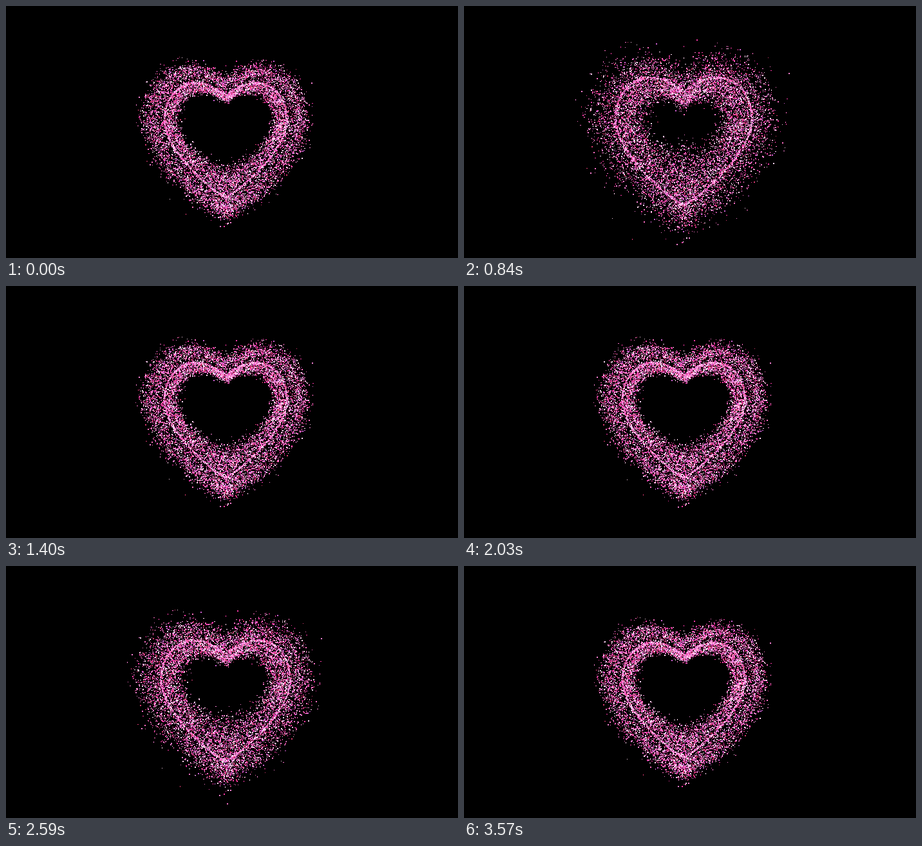
An HTML page with a canvas that plays this animation: 702 by 392 pixels, repeating every 3640 ms.

```html
<!DOCTYPE html>
<html lang="en">
<head>
<meta charset="utf-8">
<title>Beating heart</title>
<style>
html, body { margin: 0; width: 100%; height: 100%; overflow: hidden; background: #000; }
canvas { display: block; width: 702px; height: 392px; }
</style>
</head>
<body>
<canvas id="stage" width="702" height="392"></canvas>
<script>
const ctx = document.getElementById('stage').getContext('2d');
const CX = 340.5, CY = 190;
const LOOP = 3640, STEP = 70;
const BEAT = 1600, RISE = 690, START = 150;
const COLORS = ['#ff6ec4', '#fa38a8', '#f780d2', '#ffd6f0', '#d8386f', '#cc5fd0'];

// Right half of the heart: Bezier points and share of the outline.
const CURVES = [
  { share: 0.18, p: [0, -52, 14, -60, 28, -71, 46, -71] },
  { share: 0.29, p: [46, -71, 76, -71, 95, -45, 95, -12] },
  { share: 0.53, p: [95, -12, 95, 32, 24, 96, 0, 107] }
];

let seed = 20731;
function rand() {
  seed = (seed + 0x6d2b79f5) | 0;
  let n = Math.imul(seed ^ (seed >>> 15), 1 | seed);
  n = (n + Math.imul(n ^ (n >>> 7), 61 | n)) ^ n;
  return ((n ^ (n >>> 14)) >>> 0) / 4294967296;
}
const gauss = () => Math.sqrt(-2 * Math.log(1 - rand())) * Math.cos(2 * Math.PI * rand());
const jitter = r => (rand() * 2 - 1) * r;

function outline() {
  let pick = rand(), i = 0;
  while (i < 2 && pick > CURVES[i].share) pick -= CURVES[i++].share;
  const p = CURVES[i].p, t = rand(), u = 1 - t;
  const at = k => u * u * u * p[k] + 3 * u * u * t * p[k + 2] + 3 * u * t * t * p[k + 4] + t * t * t * p[k + 6];
  return { x: at(0) * (rand() < 0.5 ? -1 : 1), y: at(1) };
}

const dots = COLORS.map(() => []);
function pickColor(weights) {
  let r = rand(), i = 0;
  while (i < weights.length - 1 && r > weights[i]) r -= weights[i++];
  return i;
}
const MIXED = [0.26, 0.2, 0.2, 0.2, 0.08, 0.06];
const PINK = [0.5, 0.1, 0.3, 0.1, 0, 0];

// Resting place (x, y), and the way (dx, dy) the dot travels at full pulse.
function add(x, y, dx, dy, weights) {
  dots[pickColor(weights)].push({
    x, y, dx, dy,
    w: rand() < 0.42 ? 2 : 1, h: rand() < 0.42 ? 2 : 1
  });
}

// The clouds keep their middle and spread around it.
function addCloud(o, ux, uy, middle, sigma) {
  const d = gauss() * sigma, r = middle + d;
  add(o.x + ux * r + jitter(2), o.y + uy * r + jitter(2), ux * d * 1.05, uy * d * 1.05, MIXED);
}
function addHalo() {
  const o = outline(), r = Math.hypot(o.x, o.y);
  addCloud(o, o.x / r, o.y / r, 19, 9.5);
}
function addInner() {
  const o = outline(), depth = 1 + Math.max(0, o.y) / 130;
  addCloud(o, -o.x * depth, -o.y * depth, 0.09, 0.07);
}
function addLine() {
  const o = outline();
  add(o.x + jitter(1.3), o.y + jitter(1.3), o.x * 0.115, o.y * 0.115, PINK);
}

for (let i = 0; i < 5600; i++) addHalo();
for (let i = 0; i < 5200; i++) addInner();
for (let i = 0; i < 1500; i++) addLine();

function pulse(t) {
  const p = (t - START + BEAT) % BEAT;
  return Math.pow(p < RISE ? p / RISE : (BEAT - p) / (BEAT - RISE), 4);
}

function draw(t) {
  const s = pulse(t);
  ctx.fillStyle = '#000';
  ctx.fillRect(0, 0, 702, 392);
  dots.forEach((group, i) => {
    ctx.fillStyle = COLORS[i];
    for (const d of group) {
      ctx.fillRect(Math.round(CX + d.x + d.dx * s), Math.round(CY + d.y + d.dy * s), d.w, d.h);
    }
  });
}

let shown = -1;
function tick() {
  const step = Math.floor((performance.now() % LOOP) / STEP);
  if (step !== shown) draw((shown = step) * STEP);
  requestAnimationFrame(tick);
}
tick();
</script>
</body>
</html>
```
